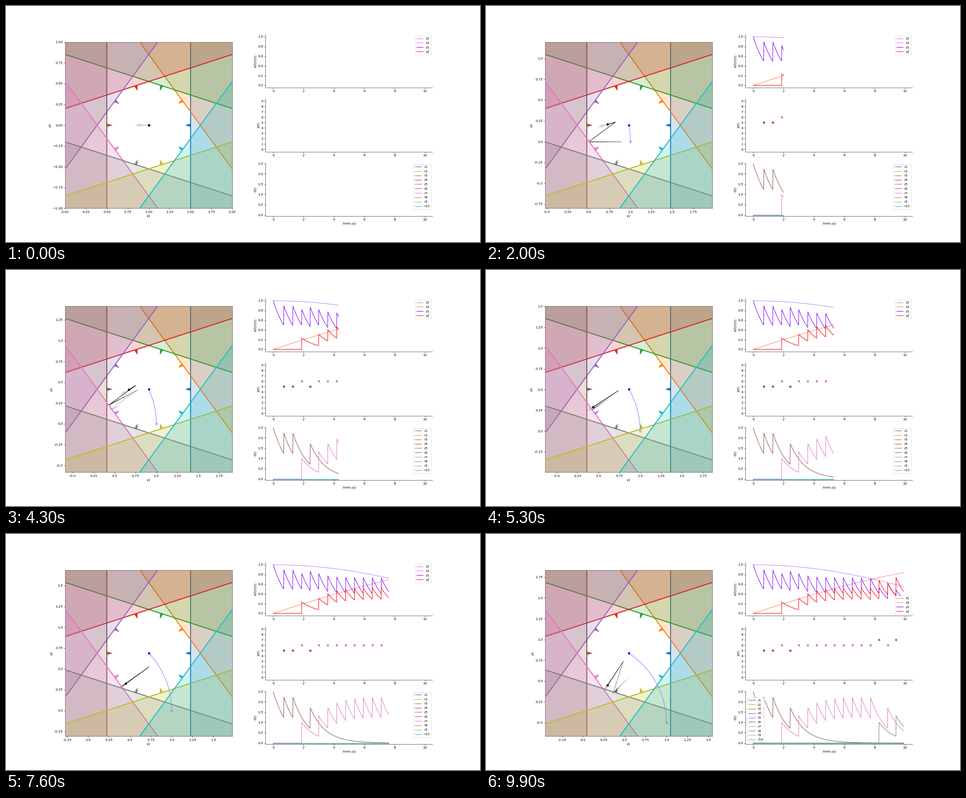
A matplotlib script for the animation above (10 s loop, 1058 px wide and 529 px high).

```python
import numpy as np
import matplotlib.pyplot as plt
from matplotlib.animation import FuncAnimation
from matplotlib.collections import LineCollection
from matplotlib.ticker import AutoLocator, ScalarFormatter
from matplotlib.transforms import Affine2D

N = 10            # neurons
DT = 0.01         # simulation step (s)
STEP = 10         # simulation steps per frame
FRAMES = 100
TRAIL = 100       # steps kept in the fading trail
THRESH, GAIN = 0.5, 0.4

angles = 2 * np.pi * np.arange(N) / N
normals = np.column_stack([np.cos(angles), np.sin(angles)])
decoder = -GAIN * normals
colors = [f"C{i}" for i in range(N)]


def simulate():
    """Leaky readout that is kicked back whenever it meets a boundary."""
    t = np.arange(FRAMES * STEP) * DT
    x = np.column_stack([np.cos(t / 10), np.sin(t / 10)])
    r = np.zeros((len(t), N))
    r[0, 5] = 2.5
    spikes = []
    for k in range(1, len(t)):
        r[k] = r[k - 1] * (1 - DT)
        reach = normals @ (r[k] @ decoder - x[k])
        i = int(np.argmax(reach))
        if reach[i] > THRESH:
            r[k, i] += 1
            spikes.append((k, i))
    return t, x, r, r @ decoder, spikes


t, x, r, y, spikes = simulate()

fig = plt.figure(figsize=(20, 10), dpi=52.9)
grid = fig.add_gridspec(3, 2)
plane = fig.add_subplot(grid[:, 0])
ax_xy, ax_s, ax_r = (fig.add_subplot(grid[i, 1]) for i in range(3))

# The view follows x, so the polygon is fixed relative to the axes.
plane.set_aspect("equal")
plane.set(xlim=(0, 2), ylim=(-1, 1), xlabel="y1", ylabel="y2")
centred = Affine2D().scale(0.5).translate(0.5, 0.5) + plane.transAxes

edges = []
for i, n in enumerate(normals):
    side = 4 * np.array([-n[1], n[0]])
    a, b = THRESH * n - side, THRESH * n + side
    edges += plane.plot(*zip(a, b), color=colors[i], lw=3,
                        transform=centred, zorder=3 + i)
    plane.fill(*zip(a, b, b + 4 * n, a + 4 * n), color=colors[i], alpha=0.2,
               lw=0, transform=centred, zorder=3 + i)

arrow_style = dict(width=0.0075, scale=12)
plane.quiver(*(THRESH * normals).T, *decoder.T, color=colors,
             transform=centred, **arrow_style)
leak = plane.quiver([1], [0], [-1], [0], color="lightgray", **arrow_style)

path, = plane.plot([], [], color="blue", alpha=0.5)
plane.plot([1], [0], "o", mfc="none", mec="blue", alpha=0.7)
trail = LineCollection([], linewidths=1.5, capstyle="projecting", zorder=2)
plane.add_collection(trail, autolim=False)
x_dot, = plane.plot([], [], "o", color="blue")
y_dot, = plane.plot([], [], "o", color="black")

for ax in (ax_xy, ax_s, ax_r):
    ax.spines[["top", "right"]].set_visible(False)
    ax.set_xlim(-0.5, 10.5)
ax_xy.set(ylim=(-0.05, 1.05), ylabel="x(t)/y(t)")
ax_s.set(ylim=(-0.5, 9.5), yticks=range(N), ylabel="s(t)")
ax_r.set(ylim=(-0.05, 2.55), ylabel="r(t)", xlabel="time (s)")

curves = []
for name, data, alpha in (("x", x, 0.5), ("y", y, 1)):
    for j, color in enumerate(["#8000ff", "red"]):
        line, = ax_xy.plot([], [], color=color, alpha=alpha,
                           label=f"{name}{j + 1}")
        curves.append((line, data[:, j]))
for i in range(N):
    line, = ax_r.plot([], [], color=colors[i], label=f"r{i + 1}")
    curves.append((line, r[:, i]))
dots = [ax_s.plot([], [], "o", color=c)[0] for c in colors]
ax_xy.legend(loc="best")
ax_r.legend(loc="best")


def set_ticks(axis, centre, first):
    if first:
        axis.set_major_locator(AutoLocator())
        axis.set_major_formatter(ScalarFormatter())
        return
    lo, hi = centre - 1, centre + 1
    ticks = np.arange(np.ceil(lo * 4) / 4, hi, 0.25)
    axis.set_ticks(ticks, labels=[str(v) for v in ticks])


def draw(frame):
    k = frame * STEP
    cx, cy = x[k]
    plane.set_xlim(cx - 1, cx + 1)
    plane.set_ylim(cy - 1, cy + 1)
    set_ticks(plane.xaxis, cx, frame == 0)
    set_ticks(plane.yaxis, cy, frame == 0)

    path.set_data(*x[:k + 1].T)
    x_dot.set_data([cx], [cy])
    y_dot.set_data(*y[k:k + 1].T)
    leak.set_offsets(y[k:k + 1])
    leak.set_UVC(*-y[k:k + 1].T)

    start = max(0, k - TRAIL)
    pts = y[start:k + 1]
    trail.set_segments(np.stack([pts[:-1], pts[1:]], axis=1))
    fade = 1 - (k - np.arange(start, k)) / TRAIL
    trail.set_color([(0, 0, 0, a) for a in fade])

    for line, data in curves:
        line.set_data(t[:k + 1], data[:k + 1])
    for i in range(N):
        times = [j for j, n in spikes if n == i and j <= k]
        dots[i].set_data(t[times], [i] * len(times))
        recent = any(j > k - STEP for j in times)
        edges[i].set_linewidth(10 if recent else 3)
    return []


anim = FuncAnimation(fig, draw, frames=FRAMES, interval=100,
                     init_func=lambda: draw(0), repeat=True, repeat_delay=0,
                     blit=False)
plt.show()
```
